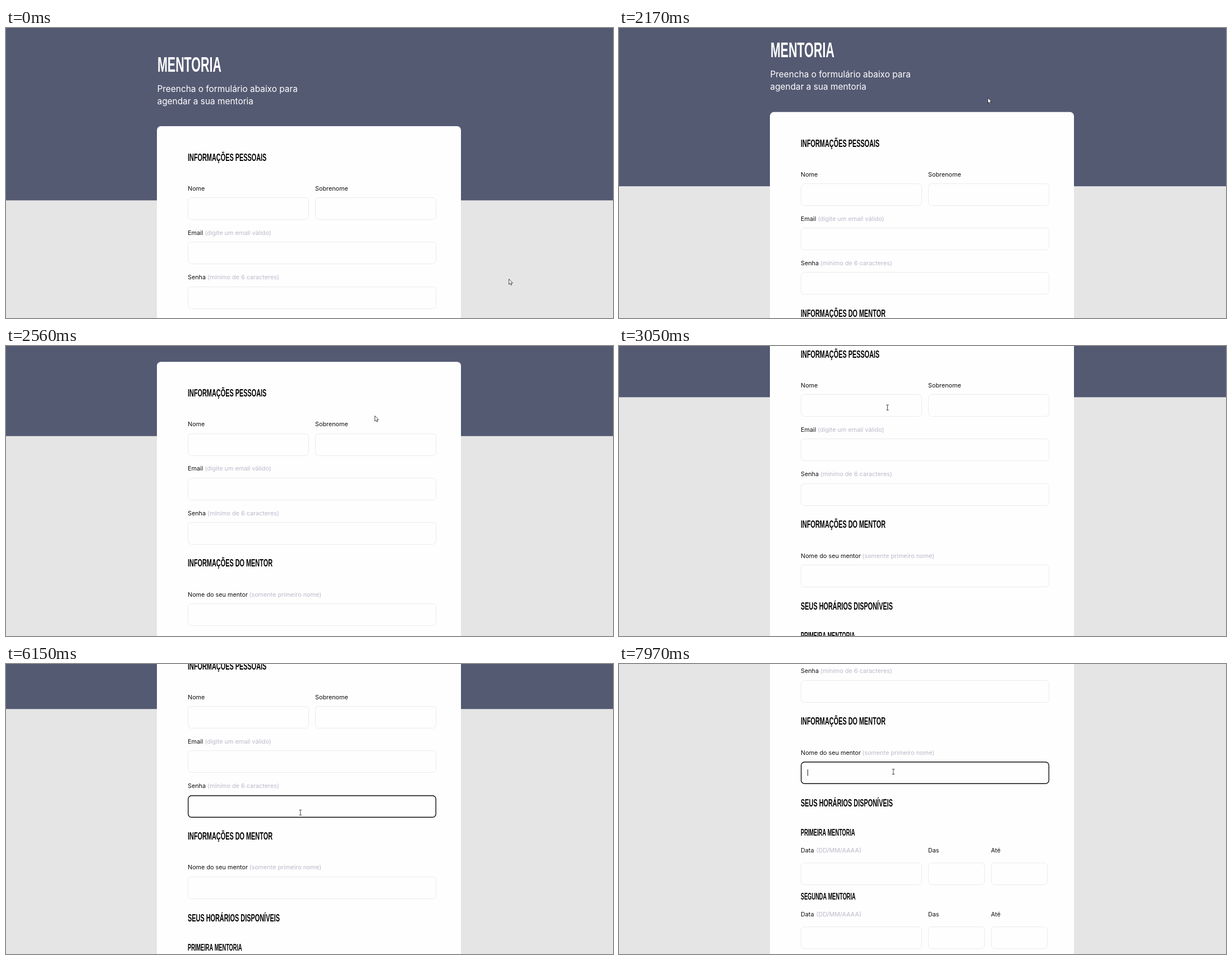
Recreate the animation shown at these times as an HTML page with a canvas. Size 1082x517 px, loop 8 s.

```html
<!DOCTYPE html>
<html lang="pt-BR">
<head>
<meta charset="utf-8">
<title>Mentoria</title>
<style>
  html, body { margin: 0; width: 100%; height: 100%; overflow: hidden; background: #e5e5e5; }
  canvas { display: block; width: 1082px; height: 517px; }
</style>
</head>
<body>
<canvas id="stage" width="1082" height="517"></canvas>
<script>
const ctx = document.getElementById('stage').getContext('2d');
const W = 1082, H = 517, LOOP = 8000;
const SLATE = '#555a73', GREY = '#e5e5e5', CARD = '#fefefe', EDGE = '#ebebf0', HINT = '#bbb9cb';
const BODY = 'Inter, "Open Sans", sans-serif';
const HEAD = '"Liberation Sans", Arial, sans-serif';
const CONDENSE = 0.573; // proportion of the narrow heading face

// Layout in page coordinates
const LEFT = 324, MIDDLE = 551, RIGHT = 663;
const HALF = 216, FULL = 443, SHORT = 101, FIELD_H = 40;
const rowY = i => 302.2 + 79.2 * i;
const slotY = i => 786 + 114 * i;

const field = (x, y, w) => ({ x, y, w });
const fields = {
  first: field(LEFT, rowY(0), HALF),
  last: field(MIDDLE, rowY(0), HALF),
  email: field(LEFT, rowY(1), FULL),
  secret: field(LEFT, rowY(2), FULL),
  mentor: field(LEFT, 606, FULL)
};
for (const i of [0, 1]) {
  fields['date' + i] = field(LEFT, slotY(i), HALF);
  fields['from' + i] = field(MIDDLE, slotY(i), SHORT);
  fields['to' + i] = field(RIGHT, slotY(i), SHORT);
}

const clicks = [
  { at: 3200, name: 'first' }, { at: 3900, name: 'last' }, { at: 4700, name: 'email' },
  { at: 5600, name: 'secret' }, { at: 7580, name: 'mentor' }
];

// Resting and turning points of the pointer: [time, x, y]
const pointerPath = [
  [70, 896, 447], [730, 518, 152], [1500, 657, 124], [2600, 657, 124],
  [3200, 446, 107], [3900, 588, 107], [4470, 566, 183], [5400, 530, 261],
  [5950, 525, 265], [6700, 524, 264], [7230, 486, 192], [7880, 486, 192], [7950, 489, 192]
];

const clamp = v => Math.min(1, Math.max(0, v));
const easeOut = (t, start, end, power) => 1 - (1 - clamp((t - start) / (end - start))) ** power;

function scrollAt(t) {
  return 216 * (easeOut(t, 2100, 2910, 1.35) + easeOut(t, 6137, 6910, 2.87));
}

function pointerAt(t) {
  let [, x, y] = pointerPath[0];
  for (let i = 1; i < pointerPath.length; i++) {
    const [t0, x0, y0] = pointerPath[i - 1], [t1, x1, y1] = pointerPath[i];
    const u = clamp((t - t0) / (t1 - t0)), k = u * u * (3 - 2 * u);
    x += (x1 - x0) * k;
    y += (y1 - y0) * k;
  }
  return [x, y];
}

function text(str, x, y, size = 10.8, color = '#111') {
  ctx.font = `400 ${size}px ${BODY}`;
  ctx.fillStyle = color;
  ctx.fillText(str, x, y);
}

function label(str, x, y, hint, hintX) {
  text(str, x, y);
  if (hint) text(hint, hintX, y, 10.8, HINT);
}

function heading(str, x, y, size = 19, color = '#000') {
  ctx.save();
  ctx.translate(x, y);
  ctx.scale(CONDENSE, 1);
  ctx.font = `700 ${size}px ${HEAD}`;
  ctx.fillStyle = color;
  ctx.fillText(str, 0, 0);
  ctx.restore();
}

function box(x, y, w, h, r) {
  ctx.beginPath();
  ctx.roundRect(x, y, w, h, r);
}

function drawField({ x, y, w }, focused) {
  const line = focused ? 1.4 : 1, half = line / 2;
  box(x + half, y + half, w - line, FIELD_H - line, 6);
  ctx.lineWidth = line;
  ctx.strokeStyle = focused ? '#101010' : EDGE;
  ctx.stroke();
}

function drawPage(scroll) {
  ctx.save();
  ctx.translate(0, -scroll);
  ctx.fillStyle = SLATE;
  ctx.fillRect(0, 0, W, 307.3);
  heading('MENTORIA', 270, 77.6, 37.4, '#fff');
  text('Preencha o formulário abaixo para', 269.5, 113.5, 15.4, '#fff');
  text('agendar a sua mentoria', 269.5, 135.5, 15.4, '#fff');

  box(269, 175, 542, 1000, 7);
  ctx.fillStyle = CARD;
  ctx.fill();

  heading('INFORMAÇÕES PESSOAIS', LEFT, 237);
  label('Nome', LEFT, 290);
  label('Sobrenome', MIDDLE, 290);
  label('Email', LEFT, 369, '(digite um email válido)', 354.5);
  label('Senha', LEFT, 448.2, '(mínimo de 6 caracteres)', 359);

  heading('INFORMAÇÕES DO MENTOR', LEFT, 540);
  label('Nome do seu mentor', LEFT, 593.5, '(somente primeiro nome)', 433.5);

  heading('SEUS HORÁRIOS DISPONÍVEIS', LEFT, 685.7);
  ['PRIMEIRA MENTORIA', 'SEGUNDA MENTORIA'].forEach((title, i) => {
    const y = slotY(i);
    heading(title, LEFT, y - 48.3, 16.1);
    label('Data', LEFT, y - 18, '(DD/MM/AAAA)', 351.5);
    label('Das', MIDDLE, y - 18);
    label('Até', RIGHT, y - 18);
  });
  ctx.restore();
}

function drawCaret({ x, y }) {
  ctx.fillStyle = '#222';
  ctx.fillRect(x + 12, y + 14, 1, 11.5);
}

function drawArrow(x, y) {
  const shape = [[0, 0], [0, 9.6], [2.2, 7.6], [3.6, 10.9], [5.1, 10.3], [3.8, 7.1], [6.6, 7]];
  ctx.beginPath();
  for (const [dx, dy] of shape) ctx.lineTo(x + 0.5 + dx, y + 0.5 + dy);
  ctx.closePath();
  ctx.fillStyle = '#fff';
  ctx.strokeStyle = '#1c1c22';
  ctx.lineWidth = 0.8;
  ctx.fill();
  ctx.stroke();
}

function drawBeam(x, y) {
  ctx.beginPath();
  for (const dy of [-4.5, 4.5]) {
    ctx.moveTo(x - 2.3, y + dy);
    ctx.lineTo(x + 2.3, y + dy);
  }
  ctx.moveTo(x, y - 4.5);
  ctx.lineTo(x, y + 4.5);
  ctx.strokeStyle = '#444';
  ctx.lineWidth = 1;
  ctx.stroke();
}

function draw(t) {
  const scroll = scrollAt(t);
  const click = clicks.filter(c => c.at <= t).pop();
  const [px, py] = pointerAt(t);
  let overField = false;

  ctx.fillStyle = GREY;
  ctx.fillRect(0, 0, W, H);
  drawPage(scroll);

  for (const [name, { x, y, w }] of Object.entries(fields)) {
    const onScreen = field(x, Math.round(y - scroll), w);
    const focused = click?.name === name;
    drawField(onScreen, focused);
    if (focused && (t - click.at) % 1000 < 500) drawCaret(onScreen);
    overField ||= px > x && px < x + w && py > onScreen.y && py < onScreen.y + FIELD_H;
  }
  (overField ? drawBeam : drawArrow)(px, py);
}

const start = performance.now();
function tick() {
  draw((performance.now() - start) % LOOP);
  requestAnimationFrame(tick);
}
tick();
</script>
</body>
</html>
```
